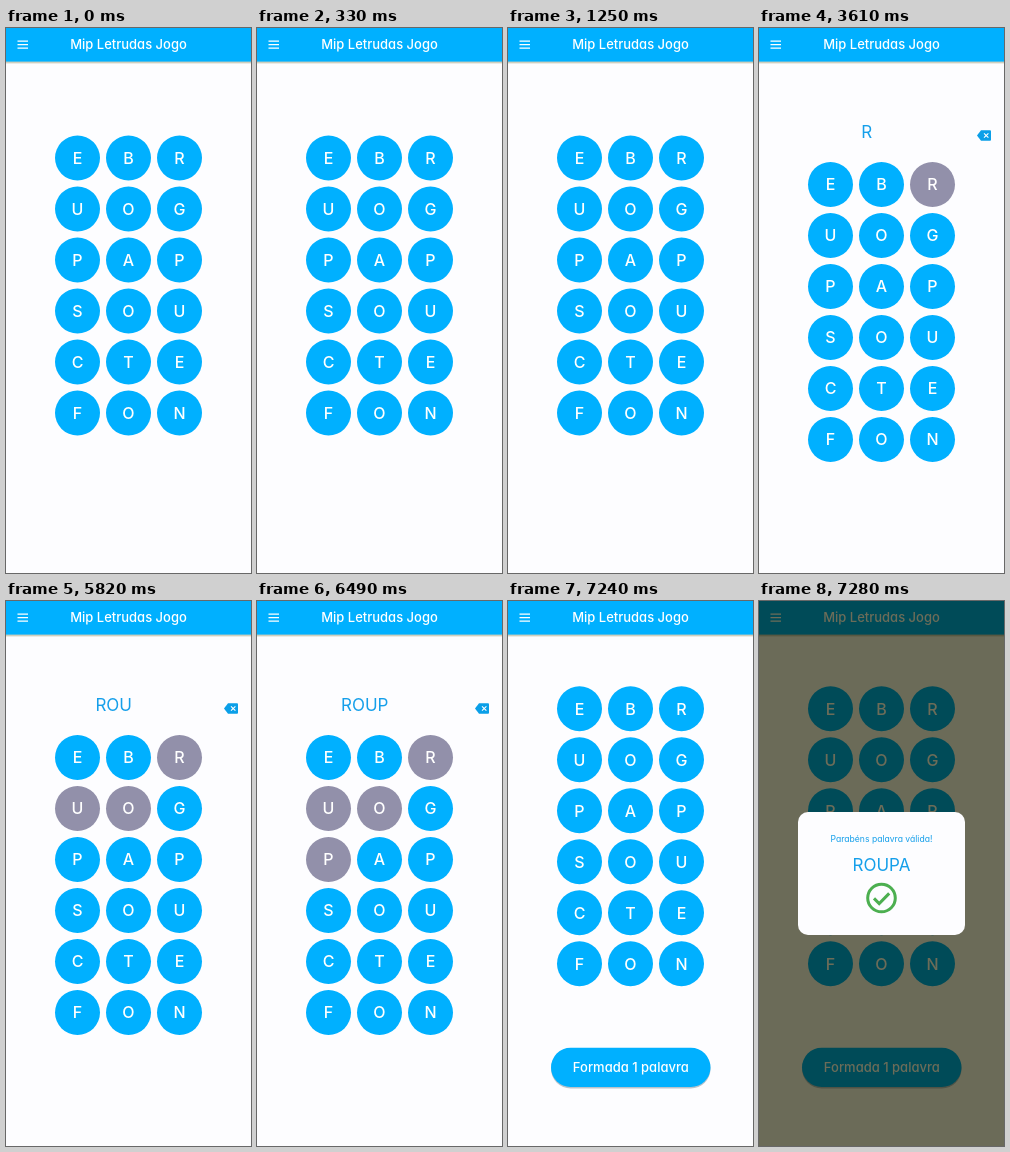
Write an HTML page that moves like this. It is 245 by 545 pixels and loops after 8 s.

```html
<!DOCTYPE html>
<html lang="pt">
<head>
<meta charset="utf-8">
<title>Mip Letrudas Jogo</title>
<style>
  html, body { margin: 0; width: 100%; height: 100%; overflow: hidden; background: #fdfdff; }
  svg { display: block; width: 100vw; height: 100vh; isolation: isolate; }
  text {
    font-family: Inter, "Open Sans", sans-serif;
    font-feature-settings: "cv11";
    text-anchor: middle;
    fill: #fff;
  }
  .title { font-size: 13px; font-weight: 550; }
  .key { font-size: 16px; font-weight: 500; }
  .word { font-size: 17px; fill: #159fea; }
  .note { font-size: 8.6px; fill: #159fea; }
  .dim { fill: #6c6c58; mix-blend-mode: multiply; }
</style>
</head>
<body>
<svg viewBox="0 0 245 545">
  <rect width="245" height="545" fill="#fdfdff"/>
  <rect y="33" width="245" height="2.4" fill="#cfcfbe"/>
  <rect width="245" height="33.6" fill="#00b0ff"/>
  <path d="M11.5 13.2h10.5M11.5 16.7h10.5M11.5 20.2h10.5" stroke="#fff" stroke-width="1.2"/>
  <text class="title" x="122.5" y="21.4">Mip Letrudas Jogo</text>

  <g id="board"></g>

  <g id="entry">
    <text id="word" class="word" x="107.7" y="109.7"></text>
    <path d="M218 107.5l4-5.2h9q1 0 1 1v8.4q0 1-1 1h-9z" fill="#0a9fe8"/>
    <path d="M225 105.3l4.4 4.4M229.4 105.3l-4.4 4.4" stroke="#fff" stroke-width="1.1"/>
  </g>

  <g id="button">
    <rect x="43" y="448" width="159.5" height="39.5" rx="19.7" fill="#b9c3cb"/>
    <rect x="43" y="446.8" width="159.5" height="39.2" rx="19.6" fill="#00b0ff"/>
    <text class="title" x="122.8" y="471">Formada 1 palavra</text>
  </g>

  <g id="dialog">
    <rect class="dim" width="245" height="545"/>
    <rect x="39" y="211" width="167" height="123" rx="10" fill="#fdfdff"/>
    <text class="note" x="122.5" y="241">Parabéns palavra válida!</text>
    <text class="word" x="122.5" y="270">ROUPA</text>
    <g fill="none" stroke="#4caf50" stroke-width="3">
      <circle cx="122.5" cy="297" r="13.8"/>
      <path d="M115 297.4l5.2 5.2 10-10.2"/>
    </g>
  </g>
</svg>
<script>
const LOOP = 8000, PITCH = 51, BLUE = '#00b0ff', GREY = '#9290aa';
const LETTERS = 'EBRUOGPAPSOUCTEFON';
const PICKS = [2, 4, 3, 6];

// start time, top row centre, letters picked, entry line, button, dialog
const STEPS = [
  [0,    130,   0, false, false, false],
  [3610, 156.5, 1, true,  false, false],
  [4440, 156.5, 2, true,  false, false],
  [5820, 156.5, 3, true,  false, false],
  [6490, 156.5, 4, true,  false, false],
  [7240, 107.7, 0, false, true,  false],
  [7280, 107.7, 0, false, true,  true]
];

const $ = id => document.getElementById(id);
const add = (parent, tag, attrs) => {
  const el = document.createElementNS('http://www.w3.org/2000/svg', tag);
  for (const key in attrs) el.setAttribute(key, attrs[key]);
  return parent.appendChild(el);
};
const show = (id, on) => $(id).setAttribute('visibility', on ? 'visible' : 'hidden');

const discs = [...LETTERS].map((letter, i) => {
  const x = 71.5 + i % 3 * PITCH, y = Math.floor(i / 3) * PITCH;
  const disc = add($('board'), 'circle', { cx: x, cy: y, r: 22.5 });
  add($('board'), 'text', { class: 'key', x, y: y + 5.9 }).textContent = letter;
  return disc;
});

let current;
function draw(step) {
  const [, top, count, entry, button, dialog] = step;
  const picked = PICKS.slice(0, count);
  $('board').setAttribute('transform', `translate(0 ${top})`);
  discs.forEach((disc, i) => disc.setAttribute('fill', picked.includes(i) ? GREY : BLUE));
  $('word').textContent = picked.map(i => LETTERS[i]).join('');
  show('entry', entry);
  show('button', button);
  show('dialog', dialog);
}

const start = performance.now();
function tick() {
  const t = (performance.now() - start) % LOOP;
  const step = STEPS.filter(s => s[0] <= t).pop();
  if (step !== current) draw(current = step);
  requestAnimationFrame(tick);
}
tick();
</script>
</body>
</html>
```
